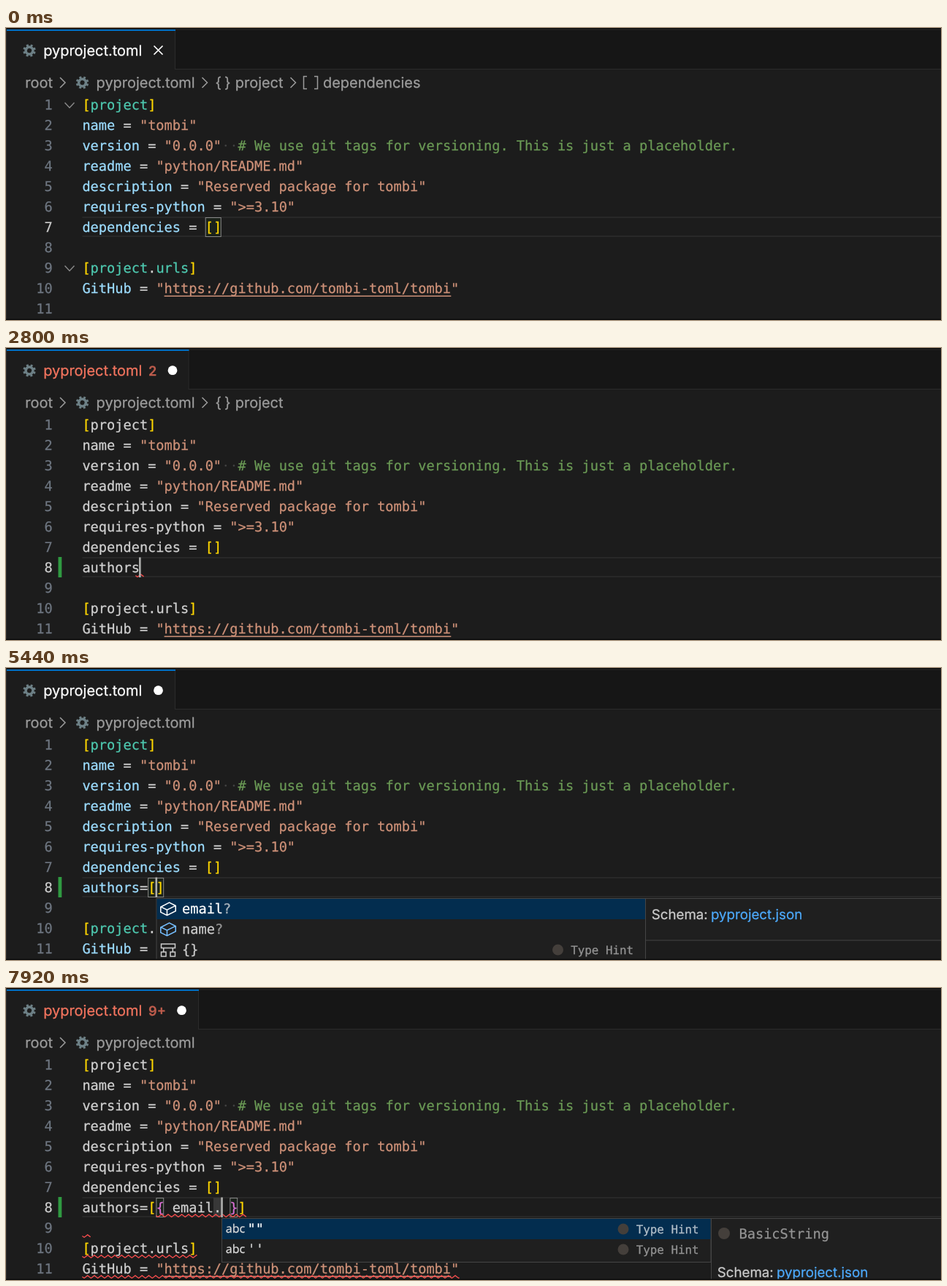
An HTML page for the animation above (8000 ms loop, 1280 by 401 pixels).

```html
<!DOCTYPE html>
<html lang="en">
<head>
<meta charset="utf-8">
<title>TOML completion</title>
<style>
html, body { margin: 0; width: 100%; height: 100%; overflow: hidden; background: #1c1c1c; }
svg { display: block; }
text { text-rendering: geometricPrecision; font-variant-ligatures: none; stroke-width: 0.25px; }
.code { font: 18.636px "DejaVu Sans Mono", monospace; }
.small { font: 15.84px "DejaVu Sans Mono", monospace; }
.ui { font: 19.95px Inter, sans-serif; }
.doc { font: 18.7px Inter, sans-serif; }
.badge { font: 600 18.2px Inter, sans-serif; }
.abc { font: 16px "Noto Sans", sans-serif; }
.line { fill: none; }
</style>
</head>
<body>
<svg id="stage" width="1280" height="401" viewBox="0 0 1280 401"></svg>
<script>
const LOOP = 8000, LEFT = 104.4, CHAR = 11.22, ROW = 28;
const C = {
  fg: '#d0d0d0', key: '#9cdcfe', head: '#4ec9b0', str: '#ce9178', note: '#6a9955',
  gold: '#ffd700', pink: '#da70d6', dim: '#9d9d9d', num: '#6e7681', err: '#f14c4c',
  edge: '#2b2b2b', box: '#454545', panel: '#1f1f1f', pick: '#032d4f', icon: '#6d8086', mark: '#443f3b'
};

const top7 = [
  '[project]',
  'name = "tombi"',
  'version = "0.0.0"  # We use git tags for versioning. This is just a placeholder.',
  'readme = "python/README.md"',
  'description = "Reserved package for tombi"',
  'requires-python = ">=3.10"',
  'dependencies = []'
];
const tail = ['', '[project.urls]', 'GitHub = "https://github.com/tombi-toml/tombi"', ''];

const lists = {
  keys: { x: 105, rows: [['field', 'authors?', 'Project authors'],
    ['field', 'classifiers?', 'Applicable Trove classifiers'],
    ['field', 'dynamic?', 'Dynamic metadata values']] },
  table: { x: 206, rows: [['field', 'email?'], ['field', 'name?'], ['struct', '{}', 'Type Hint']] },
  string: { x: 295.5, rows: [['abc', '""', 'Type Hint'], ['abc', "''", 'Type Hint']] }
};
const docs = {
  authors: { x: 774.5, head: 'Project authors' },
  email: { x: 875.5 },
  basic: { x: 965.5, head: 'BasicString', mark: true }
};

// Each step changes part of the editor state from its time on.
const steps = [
  [0, { text: null, row: 7, col: 17, typed: -600, dirty: false, badge: '', crumbs: 3, plain: false,
        bar: 0, list: '', doc: '', match: [[7, 15, 2]], waves: [], stop: null }],
  [400, { text: '', row: 8, col: 0, typed: 400, dirty: true, match: [] }],
  [640, { bar: 9 }],
  [880, { list: 'keys' }],
  [1200, { doc: 'authors' }],
  [1680, { text: 'authors', col: 7, typed: 1680, list: '', doc: '', bar: 8 }],
  [1920, { plain: true, badge: '2', crumbs: 2, waves: [[8, 6.5, 7.5]] }],
  [2880, { text: 'authors=', col: 8, typed: 2880, waves: [[8, 7.5, 8.5]] }],
  [3040, { crumbs: 1 }],
  [4000, { text: 'authors=[]', col: 9, typed: 4000, match: [[8, 8, 2]], waves: [] }],
  [4240, { plain: false, badge: '', list: 'table' }],
  [4640, { doc: 'email' }],
  [5720, { text: 'authors=[{ email }]', col: 16, typed: 5720, list: '', doc: '', stop: [16, 0.15],
           match: [[8, 9, 1], [8, 17, 1]] }],
  [5920, { plain: true, badge: '9+', waves: [[8, 9, 19], [9, 0, 1], [10, 0, 14], [11, 0, 46]] }],
  [6800, { text: 'authors=[{ email. }]', col: 17, typed: 6800, stop: [16, 1],
           match: [[8, 9, 1], [8, 18, 1]], waves: [[8, 9, 20], [9, 0, 1], [10, 0, 14], [11, 0, 46]] }],
  [6960, { list: 'string' }],
  [7040, { doc: 'basic' }]
];
const scenes = [];
steps.reduce((prev, [at, change]) => {
  const state = { ...prev, ...change };
  scenes.push({ at, state });
  return state;
}, {});

const colX = c => LEFT + c * CHAR;
const rowY = r => 91 + (r - 1) * ROW;
const esc = s => s.replace(/&/g, '&amp;').replace(/</g, '&lt;');
const text = (cls, x, y, s, fill, anchor = 'start') =>
  `<text class="${cls}" x="${x}" y="${y}" fill="${fill}" stroke="${fill}" text-anchor="${anchor}">${esc(s)}</text>`;
const rect = (x, y, w, h, fill, stroke = 'none') =>
  `<rect x="${x}" y="${y}" width="${w}" height="${h}" fill="${fill}" stroke="${stroke}"/>`;
const path = (d, stroke, w = 1.5) =>
  `<path class="line" d="${d}" stroke="${stroke}" stroke-width="${w}"/>`;
const dot = (x, y, r, fill) => `<circle cx="${x}" cy="${y}" r="${r}" fill="${fill}"/>`;
const chevron = x => path(`M${x - 3.5} 68l7 7l-7 7`, C.dim);

function gear(x, y) {
  const ring = (r, w, dash) => `<circle class="line" cx="${x}" cy="${y}" r="${r}" stroke="${C.icon}" ` +
    `stroke-width="${w}" stroke-dasharray="${dash}"/>`;
  const tooth = Math.PI * 7.4 / 8;
  return `<g transform="rotate(11.25 ${x} ${y})">` +
    ring(4.9, 3.6, 'none') + ring(7.4, 2.8, `${tooth} ${tooth}`) + '</g>';
}

// Zigzag that starts mid-height, dips first and is cut at the end of its range.
function wave(row, from, to) {
  const x0 = colX(from), x1 = colX(to), half = 4.66, mid = rowY(row) + 25.7, amp = 1.75;
  const height = x => {
    const p = (x - x0 + half / 2 - 0.3) / half, k = Math.floor(p), f = p - k;
    return mid + amp * (k % 2 ? 1 - 2 * f : 2 * f - 1);
  };
  const bends = [x0];
  for (let x = x0 + half / 2 + 0.3; x < x1; x += half) bends.push(x);
  bends.push(x1);
  return path('M' + bends.map(x => `${x} ${height(x)}`).join('L'), C.err, 1.4);
}

function tokenColor(s, header, plain) {
  if (s[0] === '#') return C.note;
  if (s[0] === '"') return C.str;
  if (/[[\]]/.test(s)) return C.gold;
  if (/[{}]/.test(s)) return C.pink;
  if (plain || !/\w/.test(s)) return C.fg;
  return header ? C.head : C.key;
}

function codeLine(src, row, plain) {
  const y = rowY(row) + 20.5;
  let out = '';
  for (const m of src.matchAll(/#.*|"[^"]*"|[\w-]+|[^\s\w]/g))
    out += text('code', colX(m.index), y, m[0], tokenColor(m[0], src[0] === '[', plain));
  const url = src.match(/https[^"]*/);
  if (url) out += rect(colX(url.index), y + 3.9, url[0].length * CHAR, 1.5, C.str);
  const gap = src.indexOf('  #');
  if (gap > 0) out += [0, 1].map(i => dot(colX(gap + i + 0.5), y - 6, 1.3, '#454545')).join('');
  return out;
}

function tabs(s) {
  const right = { '': 231, '2': 249.5, '9+': 263 }[s.badge];
  const markX = { '': 208.5, '2': 228, '9+': 240.5 }[s.badge];
  return rect(0, 0, 1280, 57, '#161616') + rect(0, 0, 1280, 1.5, '#0c0c0c') +
    rect(0, 1.5, 1280, 1, C.edge) + rect(right, 56, 1280, 1, C.edge) +
    rect(1, 3, right - 1, 54, '#1c1c1c') + rect(right, 3, 1, 54, C.edge) +
    rect(1, 2, right, 2, '#0070c4') + gear(32, 31) +
    text('ui', 51.2, 38, 'pyproject.toml', s.badge ? '#f4755f' : '#ffffff') +
    text('badge', 195, 37.6, s.badge, '#bf5d4d') +
    (s.dirty ? dot(markX, 30.7, 6.4, '#ffffff')
             : path(`M${markX - 6} 24.5l12 12m0-12l-12 12`, '#ffffff', 1.7));
}

function crumbs(n) {
  const label = (x, s) => text('ui', x, 82, s, C.dim);
  let out = label(26.3, 'root') + chevron(77.5) + gear(104.5, 75) + label(123.6, 'pyproject.toml');
  if (n > 1) out += chevron(272) + label(286.5, '{') + label(299, '}') + label(313.8, 'project');
  if (n > 2) out += chevron(393) + path('M412 66.5h-4.5v17h4.5M422 66.5h4.5v17h-4.5', C.dim) +
    label(434, 'dependencies');
  return out;
}

const icons = {
  field: (x, y, c) => `<g transform="translate(${x + 3.6} ${y + 1.3}) scale(1.55)">` +
    path('M1.4 6.4L9 2.5L14.6 5.3V10L7 13.8L1.4 11ZM1.4 6.2L7 9L14.6 5.2M7 9V13.8', c, 1) + '</g>',
  struct: (x, y) => path(`M${x + 6.5} ${y + 6}h19v5.5h-19zM${x + 6.5} ${y + 17}h6.5v6h-6.5z` +
    `M${x + 19} ${y + 17}h6.5v6h-6.5zM${x + 9.7} ${y + 11.5}v5.5M${x + 22.3} ${y + 11.5}v5.5`, '#cccccc'),
  abc: (x, y) => text('abc', x + 5.3, y + 19, 'abc', '#d8d8d8')
};

function popup({ x, rows }) {
  const h = rows.length > 2 ? 100 : 60;
  let out = rect(x, 316.5, 669.5, h, C.panel, C.box) + rect(x + 0.5, 317, 668.5, ROW, C.pick);
  rows.forEach(([icon, label, detail], i) => {
    const y = 317 + i * ROW, name = label.replace('?', '');
    out += icons[icon](x, y, i ? '#75beff' : '#ffffff') +
      text('code', x + 35, y + 20.2, name, i ? '#cccccc' : '#ffffff');
    if (name !== label) out += text('code', x + 35 + name.length * CHAR, y + 20.2, '?', i ? '#949494' : '#a9b4bd');
    if (!detail) return;
    out += text('small', x + 653, y + 19.6, detail, i ? '#949494' : '#b4c0ca', 'end');
    if (detail === 'Type Hint') out += dot(x + 549.5, y + 14, 7.5, C.mark);
  });
  return out;
}

function docPanel({ x, head, mark }) {
  const base = head ? 397.3 : 344.5;
  let out = rect(x, 316.5, 1290 - x, head ? 100 : 57.5, C.panel, C.box);
  if (mark) out += dot(x + 17.5, 337, 8, C.mark);
  if (head) out += text('code', x + (mark ? 38 : 9), 343.5, head, '#949494');
  return out + text('doc', x + 8.3, base, 'Schema:', '#cccccc') +
    text('doc', x + 89.5, base, 'pyproject.json', '#4daafc');
}

function draw(s) {
  const lines = [...top7, ...(s.text === null ? [] : [s.text]), ...tail].slice(0, 11);
  const rowTop = rowY(s.row);
  let out = rect(0, 0, 1280, 401, '#1c1c1c') + tabs(s) + crumbs(s.crumbs);
  out += rect(LEFT, rowTop, 1280, 2, '#282828') + rect(LEFT, rowTop + 26, 1280, 2, '#282828');
  if (s.bar) out += rect(71.5, rowY(s.bar), 4.8, ROW, '#2f9a41');
  if (s.stop) out += rect(colX(s.stop[0]), rowTop + 1, s.stop[1] * CHAR, 26, '#383838');
  for (const [r, c, n] of s.match)
    out += rect(colX(c) + 0.5, rowY(r) + 1.5, n * CHAR - 1.4, 26, '#1b221b', '#888888');
  lines.forEach((src, i) => {
    const r = i + 1;
    out += text('code', 63.7, rowY(r) + 20.5, String(r), r === s.row ? '#cccccc' : C.num, 'end') +
      codeLine(src, r, s.plain);
    if (s.text === null && src[0] === '[') out += path(`M80.5 ${rowY(r) + 11.5}l6.5 7l6.5-7`, '#8a8a8a', 1.4);
  });
  out += s.waves.map(w => wave(...w)).join('');
  out += `<g id="caret">${rect(colX(s.col) - 0.9, rowTop + 0.5, 2.6, 27.5, '#aeafad')}</g>`;
  if (s.doc) out += docPanel(docs[s.doc]);
  if (s.list) out += popup(lists[s.list]);
  return out + rect(0, 0, 1, 401, C.edge) + rect(0, 399.5, 1280, 1.5, '#0c0c0c');
}

const stage = document.getElementById('stage');
let shown = null;
function frame(now) {
  const t = now % LOOP;
  const { state } = scenes.findLast(s => s.at <= t);
  if (state !== shown) {
    stage.innerHTML = draw(state);
    shown = state;
  }
  const lit = (t - state.typed) % 1000 < 500;
  document.getElementById('caret').setAttribute('visibility', lit ? 'visible' : 'hidden');
  requestAnimationFrame(() => frame(performance.now() - start));
}
const start = performance.now();
frame(0);
</script>
</body>
</html>
```
